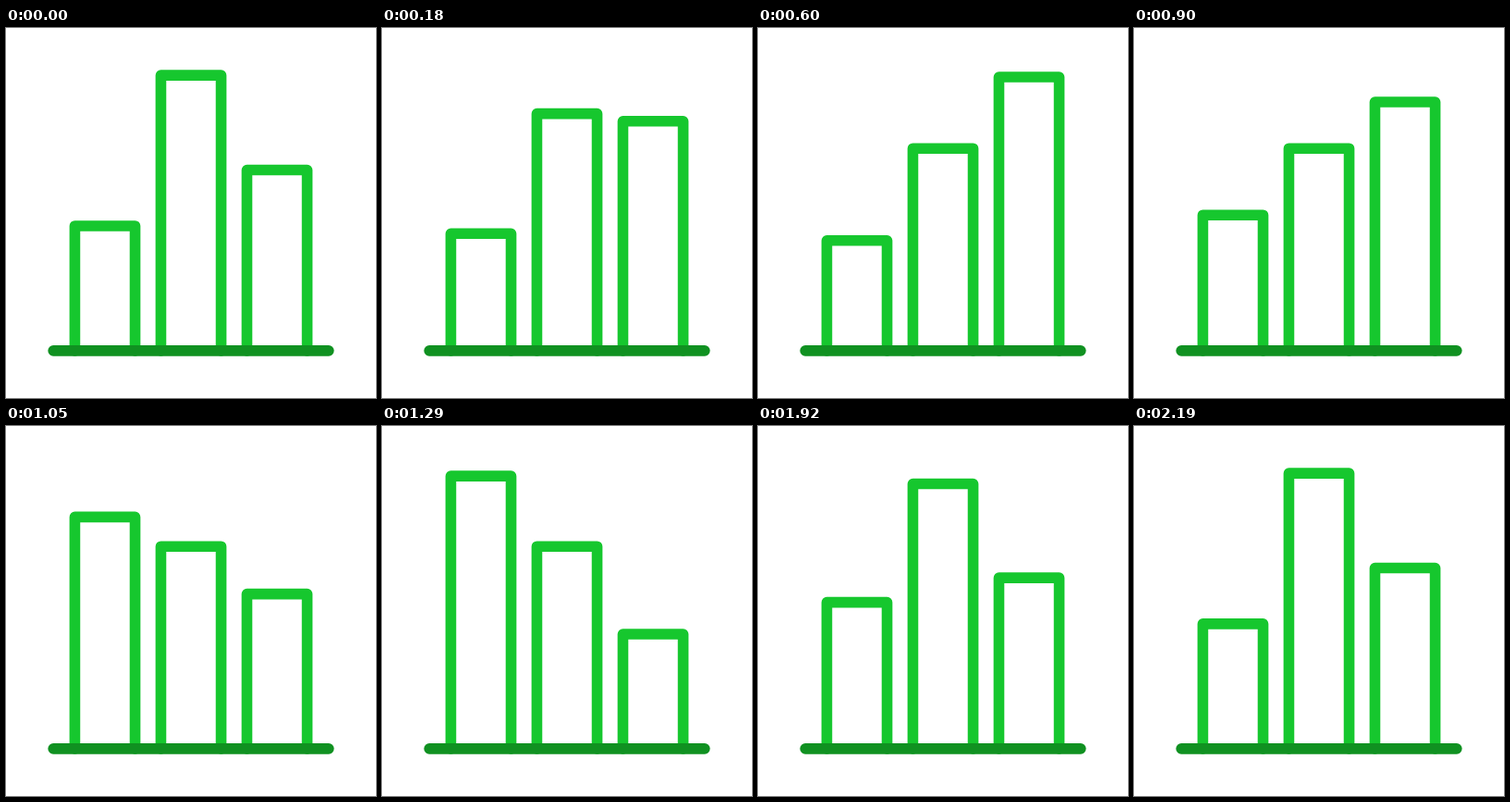
An HTML page with a canvas for the animation above (2430 ms loop, 400 by 400 pixels).

```html
<!DOCTYPE html>
<html lang="en">
<head>
<meta charset="utf-8">
<title>Bar chart</title>
<style>
  html, body { margin: 0; width: 100%; height: 100%; overflow: hidden; background: #fff; }
  canvas { display: block; width: 400px; height: 400px; }
</style>
</head>
<body>
<canvas id="stage" width="400" height="400"></canvas>
<script>
const ctx = document.getElementById('stage').getContext('2d');

const LOOP = 2430, TICK = 30, PHASE = 800, MOVE = 600;
const GRID = 430; // drawing units across the stage
const BASE_Y = 375, BAR_WIDTH = 70;
const BAR_X = [80, 180, 280];
// Top edge of each bar at the start of every phase
const POSES = [
  [230, 55, 165],
  [247, 140, 57],
  [55, 140, 245],
  [230, 55, 165]
];

// Cubic bezier easing (0.32, 0, 0.12, 1), solved by bisection
function ease(x) {
  if (x <= 0 || x >= 1) return Math.min(1, Math.max(0, x));
  let low = 0, high = 1, s = 0.5;
  for (let i = 0; i < 30; i++) {
    s = (low + high) / 2;
    const bx = 3 * s * (1 - s) ** 2 * 0.32 + 3 * s * s * (1 - s) * 0.12 + s ** 3;
    if (bx < x) low = s; else high = s;
  }
  return s * s * (3 - 2 * s);
}

function strokePath(color, points) {
  ctx.strokeStyle = color;
  ctx.beginPath();
  for (const [x, y] of points) ctx.lineTo(x, y);
  ctx.stroke();
}

function draw(time) {
  const phase = Math.min(2, Math.floor(time / PHASE));
  const progress = ease((time - phase * PHASE) / MOVE);

  ctx.setTransform(1, 0, 0, 1, 0, 0);
  ctx.fillStyle = '#fff';
  ctx.fillRect(0, 0, 400, 400);
  ctx.scale(400 / GRID, 400 / GRID);
  ctx.lineWidth = 12.5;
  ctx.lineCap = ctx.lineJoin = 'round';

  BAR_X.forEach((x, i) => {
    const from = POSES[phase][i], to = POSES[phase + 1][i];
    const top = from + (to - from) * progress;
    const right = x + BAR_WIDTH;
    strokePath('#16c72e', [[x, BASE_Y], [x, top], [right, top], [right, BASE_Y]]);
  });
  strokePath('#109121', [[55, BASE_Y], [375, BASE_Y]]);
}

const start = performance.now();
function frame() {
  const elapsed = (performance.now() - start) % LOOP;
  draw(Math.floor(elapsed / TICK) * TICK);
  requestAnimationFrame(frame);
}
frame();
</script>
</body>
</html>
```
